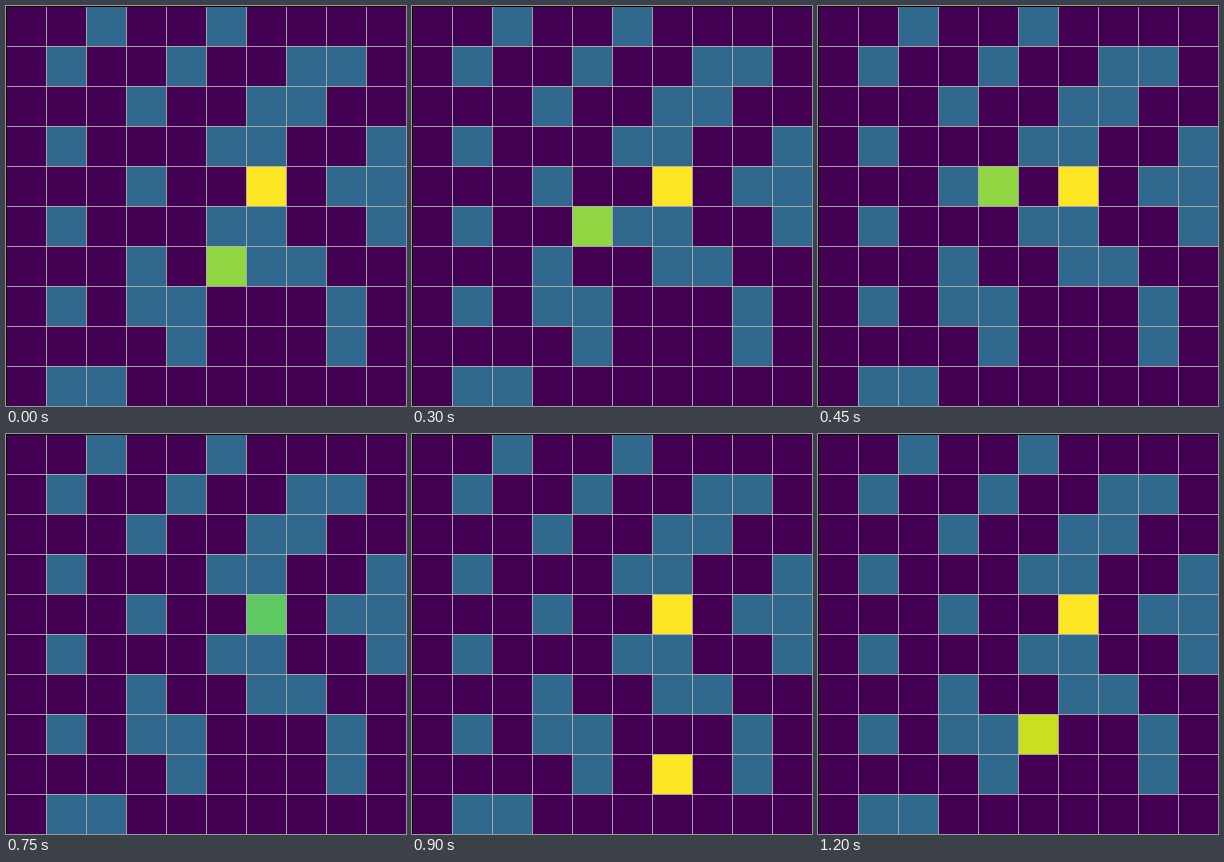
Animation, 400 px wide and 400 px high, one loop 1.35 s. Source, as an HTML page with a canvas:

```html
<!DOCTYPE html>
<html lang="en">
<head>
<meta charset="utf-8">
<title>Grid walk</title>
<style>
  html, body { margin: 0; width: 100%; height: 100%; overflow: hidden; background: #440154; }
  canvas { display: block; }
</style>
</head>
<body>
<canvas id="stage" width="400" height="400"></canvas>
<script>
const ctx = document.getElementById('stage').getContext('2d');
const CELL = 40, SIZE = 400, STEP = 150;

const MAP = [
  '..#..#....',
  '.#..#..##.',
  '...#..##..',
  '.#...##..#',
  '...#....##',
  '.#...##..#',
  '...#..##..',
  '.#.##...#.',
  '....#...#.',
  '.##.......'
];
const GOAL = [6, 4];

// The walker's colour shows the direction of its last move.
const UP = '#90d743', LEFT = '#c8e020', RIGHT = '#5ec962', START = '#fde725';
const WALK = [
  [5, 6, UP], [4, 6, LEFT], [4, 5, UP], [4, 4, UP], [5, 4, RIGHT],
  [6, 4, RIGHT], [6, 8, START], [6, 7, UP], [5, 7, LEFT]
];

function cell(col, row, color) {
  ctx.fillStyle = color;
  ctx.fillRect(col * CELL, row * CELL, CELL, CELL);
}

function drawLines() {
  ctx.fillStyle = 'rgba(176, 176, 176, 0.9)';
  for (let p = CELL; p < SIZE; p += CELL) {
    ctx.fillRect(p, 0, 1, SIZE);
    ctx.fillRect(0, p, SIZE, 1);
  }
  ctx.fillStyle = '#000';
  ctx.fillRect(0, 0, 1, SIZE);
  ctx.fillRect(0, 0, SIZE, 1);
}

function draw(time) {
  ctx.fillStyle = '#440154';
  ctx.fillRect(0, 0, SIZE, SIZE);
  MAP.forEach((line, row) => [...line].forEach((c, col) => {
    if (c === '#') cell(col, row, '#31688e');
  }));
  cell(...GOAL, START);
  cell(...WALK[Math.floor(time / STEP) % WALK.length]);
  drawLines();
}

const begin = performance.now();
function tick() {
  draw(performance.now() - begin);
  requestAnimationFrame(tick);
}
tick();
</script>
</body>
</html>
```
